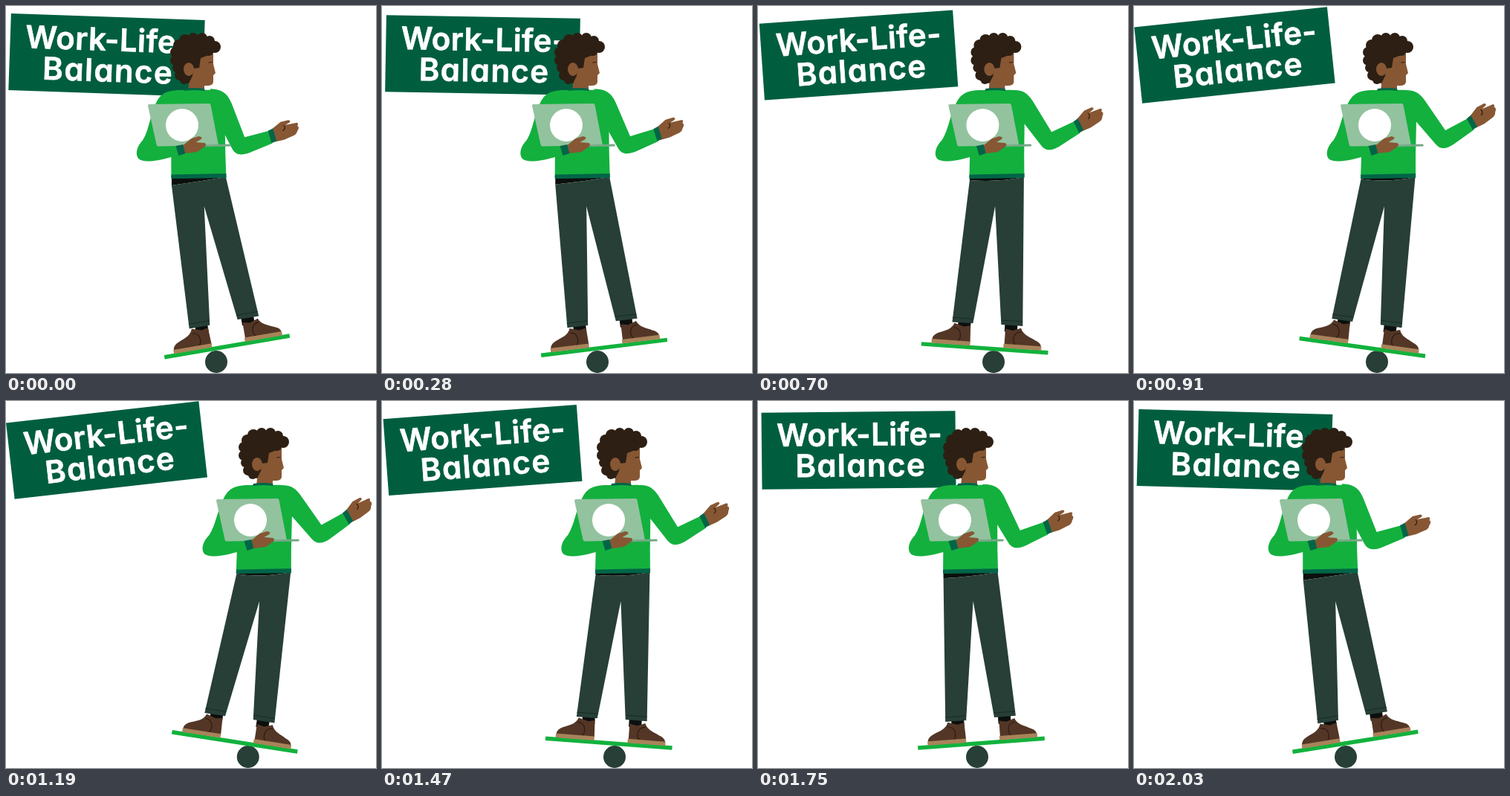
These frames come from a looping animation (498 by 493 pixels, 2100 ms). An HTML page:

```html
<!DOCTYPE html>
<html lang="en">
<head>
<meta charset="utf-8">
<title>Work-Life-Balance</title>
<style>
  html, body { margin: 0; width: 100%; height: 100%; overflow: hidden; background: #fff; }
  svg { display: block; width: 498px; height: 493px; }
  text {
    font: 600 42px Inter, Lato, sans-serif;
    font-feature-settings: "cv11";
    fill: #fff;
    stroke: #fff;
    stroke-width: .7;
    stroke-linejoin: round;
    text-anchor: middle;
  }
  .shirt { fill: #13b03e; }
  .trim { fill: #006547; }
  .skin { fill: #875734; }
  .hair { fill: #2d1f13; }
  .cloth { fill: #273f37; }
  .shoe { fill: #533626; }
  .sole { fill: #a8835a; }
  .line { fill: none; stroke: #2e1a10; stroke-width: 1.2; stroke-linecap: round; }
</style>
</head>
<body>
<svg viewBox="0 0 498 493">
  <g id="sign">
    <rect x="-130.5" y="-51.5" width="261" height="103" fill="#005e3f"/>
    <text x="1.5" y="-6" letter-spacing=".4">Work-Life-</text>
    <text x="2.5" y="35.500" letter-spacing="1.4">Balance</text>
  </g>

  <circle id="ball" class="cloth" cy="478" r="15"/>

  <g id="board">
    <rect x="-85.5" y="-2.5" width="171" height="5.5" fill="#12b23c"/>
    <path d="M-38-36H-21V-24H-38ZM25-36H42V-24H25Z" fill="#0c0f0d"/>
    <path class="shoe" d="M-21-29L-30-27L-43-31C-46-22-55-20-62-17C-70-14-72-9-71-6H-20Z"/>
    <path class="shoe" d="M26-28L36-26L47-30C50-21 60-19 67-15C75-12 76-8 75-5H26Z"/>
    <path class="line" d="M-43-25Q-35-24-34-17Q-33-10-37-7M47-25Q39-24 38-17Q37-10 41-7"/>
    <path class="sole" d="M-72-7.500H-20V-2H-72ZM25-7.500H76V-2H25Z"/>
  </g>

  <path id="lining" fill="#0c0f0d"/>
  <path id="legs" class="cloth"/>
  <path id="cuffs" fill="none" stroke="#182b25"/>

  <g id="torso">
    <path class="skin" d="M8-45L10-66L8-90L18-94L42-98V-82L45-70L42-67V-58C41-53 37-53 30-53L30-45Z"/>
    <path class="line" d="M36-84L40-84.500" stroke-width=".8"/>
    <g id="curls" class="hair">
      <path d="M-12-98L0-114L36-116L46-102L38-95L25-90L23-77L15-76L14-66L9-56L-4-60L-10-80Z"/>
    </g>
    <ellipse class="skin" cx="9" cy="-75" rx="7" ry="9"/>

    <g id="arm">
      <path class="skin" d="M124-3L136-16L146-20Q150-20 148-17L143-13L158-18Q161-17 159-14Q163-13 160-7Q160-2 154 1L144 7L131 12Z"/>
      <path class="line" d="M141-12Q145-9 141-5" stroke-width=".8"/>
      <path class="shirt" d="M36-47C54-49 61-42 67-32L91 11L122-2L129 14L100 31C90 36 82 37 76 28L46-14Z"/>
      <path class="trim" d="M121-2L127-6L134 10L128 14Z"/>
    </g>
    <g id="body">
      <path class="shirt" d="M4-47H30C43-48 52-46 57-38L58 40L59 70L-15 71V43C-40 50-54 50-59 45C-64 39-61 28-53 20C-44 5-43-15-35-30C-27-47-14-47 4-47Z"/>
      <path class="trim" d="M4-49Q17-51 30-49L31-46Q17-48 3-46Z"/>
      <path class="trim" d="M-15 66.500L59 65V71L-15 72Z"/>
    </g>

    <path d="M-44-28L36-29Q38-29 38.500-27L49 27L-32 28.500Q-34 28.500-34.500 26L-46-26Q-46-28-44-28Z" fill="#93c29f"/>
    <path d="M8 27L64 25.500Q67 26 65 28.500L8 29.500Z" fill="#75a886"/>
    <circle r="22" fill="#fff"/>
    <g transform="translate(-1.5 -2)">
      <path class="trim" d="M-7 30L3 28L6 40L-3 43Z"/>
      <path class="skin" d="M3 29L14 20L24 17Q30 18 27 21L20 25L32 26Q35 28 32 31L22 38L6 40Z"/>
    </g>
  </g>
</svg>
<script>
  const LOOP = 2100, STEP = 70;

  // time, torso x, board angle, ball x
  const poses = [
    [0, 237, -9.7, 283],
    [280, 248, -7, 290],
    [560, 286, 0.8, 309],
    [910, 324, 8, 327],
    [1085, 334, 9.8, 329],
    [1470, 305, 4.3, 313],
    [1750, 265, -4.3, 295],
    [2030, 242, -9.1, 285]
  ];

  const $ = id => document.getElementById(id);
  const set = (id, name, value) => $(id).setAttribute(name, value);

  // x, y, radius of each curl
  const curls = [
    [-4, -107, 8], [4, -114, 8], [15, -117, 7], [27, -117, 7], [37, -113, 7],
    [44, -105, 8], [36, -99, 6], [-9, -98, 7], [-9, -87, 7], [-7, -77, 6],
    [-3, -67, 7], [3, -61, 6]
  ];
  for (const [cx, cy, r] of curls) {
    const curl = document.createElementNS("http://www.w3.org/2000/svg", "circle");
    curl.setAttribute("cx", cx);
    curl.setAttribute("cy", cy);
    curl.setAttribute("r", r);
    $("curls").append(curl);
  }

  // Pose n, continuing past either end of the loop
  function poseAt(n) {
    const len = poses.length, lap = Math.floor(n / len);
    const [t, ...rest] = poses[n - lap * len];
    return [t + lap * LOOP, ...rest];
  }

  // Smooth cyclic curve through the poses
  function sample(t) {
    const i = poses.findLastIndex(p => p[0] <= t);
    const [a, b, c, d] = [-1, 0, 1, 2].map(k => poseAt(i + k));
    const span = c[0] - b[0], u = (t - b[0]) / span;
    return [1, 2, 3].map(k => {
      const m0 = (c[k] - a[k]) / (c[0] - a[0]) * span;
      const m1 = (d[k] - b[k]) / (d[0] - b[0]) * span;
      return b[k] + u * m0
        + u * u * (3 * (c[k] - b[k]) - 2 * m0 - m1)
        + u * u * u * (2 * (b[k] - c[k]) + m0 + m1);
    });
  }

  function draw(t) {
    const [x, tilt, ballX] = sample(t);
    const y = 160;
    const boardX = 302.9 + 0.56 * tilt, boardY = 460 - 0.03 * tilt * tilt;
    const rad = tilt * Math.PI / 180, cos = Math.cos(rad), sin = Math.sin(rad);
    const onBoard = (px, py) =>
      `${boardX + px * cos - py * sin} ${boardY + px * sin + py * cos}`;
    const onTorso = (px, py) => `${x + px} ${y + py}`;

    set("sign", "transform", `translate(135.5 66) rotate(${2 - 0.092 * (x - 237)})`);
    set("ball", "cx", ballX);
    set("board", "transform", `translate(${boardX} ${boardY}) rotate(${tilt})`);
    set("torso", "transform", `translate(${x} ${y})`);
    set("arm", "transform", `rotate(${0.7 - 0.75 * tilt} 50 -35)`);

    // Hips trail the shoulders by a few pixels
    const lean = 2 + 0.25 * tilt;
    set("body", "transform", `translate(0 -48) skewX(${-0.48 * lean}) translate(0 48)`);

    const gap = Math.max(0.5, 4 - 0.52 * tilt);
    const left = -14.5 - lean, right = 58.5 - lean;
    const waist = `${onTorso(left, 72 + gap)}
      Q${onTorso(22 - lean, 77.5 - gap * 0.2)} ${onTorso(right, 70)}`;
    set("lining", "d", `M${waist} L${onTorso(right, 67)} L${onTorso(left, 67)}Z`);
    set("legs", "d", `M${waist} L${onBoard(49, -33)} L${onBoard(20, -33)}
      L${onTorso(20.5 - 0.95 * tilt, 109)} L${onBoard(-18, -32)} L${onBoard(-46, -32)}Z`);
    set("cuffs", "d", `M${onBoard(-46, -38)} L${onBoard(-18, -38)}
      M${onBoard(20, -39)} L${onBoard(48.5, -39)}`);
  }

  const start = performance.now();
  function tick() {
    const t = (performance.now() - start) % LOOP;
    draw(Math.floor(t / STEP) * STEP);
    requestAnimationFrame(tick);
  }
  tick();
</script>
</body>
</html>
```
